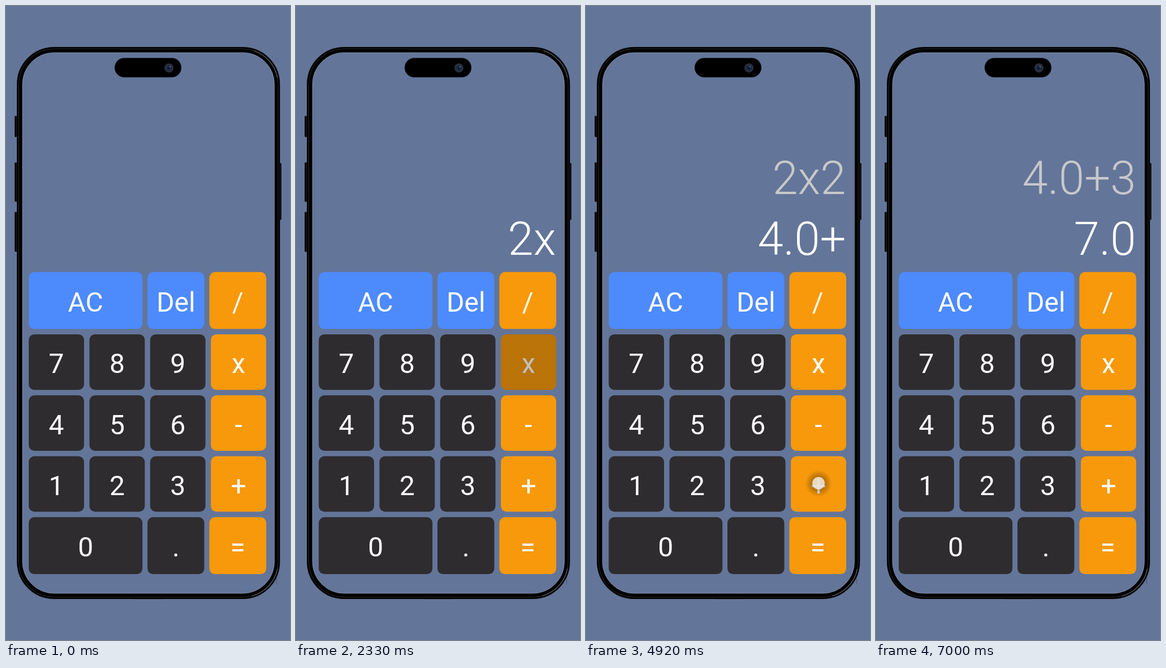
Animation, 502 px wide and 1116 px high, one loop 8 s. Source, as an HTML page with a canvas:

```html
<!DOCTYPE html>
<html lang="en">
<head>
<meta charset="utf-8">
<title>Calculator</title>
<style>
html, body { margin: 0; width: 100%; height: 100%; overflow: hidden; background: #637599; }
canvas { display: block; }
</style>
</head>
<body>
<canvas id="stage" width="502" height="1116"></canvas>
<script>
const ctx = document.getElementById('stage').getContext('2d');
const LOOP = 8000, STEP = 1000 / 12;
const DARK = '#2e2c2f', BLUE = '#4d8afc', ORANGE = '#f7990a';

// Keys: label -> [x, y, width, height, colour]
const keys = {
  AC: [40.2, 468.2, 201, 100.4, BLUE],
  Del: [250, 468.2, 100.5, 100.4, BLUE],
  '/': [359.5, 468.2, 100.5, 100.4, ORANGE],
  0: [40.2, 899.7, 201, 100.4, DARK],
  '.': [250, 899.7, 100.5, 100.4, DARK],
  '=': [359.5, 899.7, 100.5, 100.4, ORANGE]
};
['789x', '456-', '123+'].forEach((row, r) => [...row].forEach((label, c) => {
  keys[label] = [40.2 + c * 107.3, 577.9 + r * 107.3, 97.8, 97.8, c < 3 ? DARK : ORANGE];
}));

// Finger position, press time and how long the touch dot stays after it
const taps = [
  { key: '2', at: 1000, hold: 160, x: 199, y: 842, now: '2', past: '' },
  { key: 'x', at: 2000, hold: 160, x: 412, y: 627, now: '2x', past: '' },
  { key: '2', at: 2750, hold: 160, x: 199, y: 842, now: '2x2', past: '' },
  { key: '=', at: 3417, hold: 120, x: 412, y: 948, now: '4.0', past: '2x2' },
  { key: '+', at: 4834, hold: 160, x: 411, y: 840, now: '4.0+', past: '2x2' },
  { key: '3', at: 5333, hold: 160, x: 305, y: 843, now: '4.0+3', past: '2x2' },
  { key: '=', at: 5833, hold: 200, x: 422, y: 945, now: '7.0', past: '4.0+3' }
];

const clamp = v => Math.max(0, Math.min(1, v));

function box(x, y, w, h, r, fill, stroke, line = 1) {
  ctx.beginPath();
  ctx.roundRect(x, y, w, h, r);
  if (fill) { ctx.fillStyle = fill; ctx.fill(); }
  if (stroke) { ctx.strokeStyle = stroke; ctx.lineWidth = line; ctx.stroke(); }
}

function disc(x, y, r, fill) {
  ctx.beginPath();
  ctx.arc(x, y, r, 0, Math.PI * 2);
  ctx.fillStyle = fill;
  ctx.fill();
}

function text(str, x, y, font, align, fill) {
  ctx.font = font + ' Roboto, sans-serif';
  ctx.textAlign = align;
  ctx.fillStyle = fill;
  ctx.fillText(str, x, y);
}

function drawPhone() {
  ctx.fillStyle = '#637599';
  ctx.fillRect(0, 0, 502, 1116);
  for (const [x, y, h] of [[15, 193, 38], [15, 275, 70], [15, 362, 71], [482, 276, 101]])
    box(x, y, 5, h, 2, '#000', 'rgba(150,158,172,.5)', 0.8);
  box(24, 77, 455.5, 962, 61, null, '#000', 10);
  box(22.5, 75.5, 458.5, 965, 62, null, '#2c2d30');
  // light hairlines along the inner and outer edge
  box(29, 82, 445.5, 952, 56, null, 'rgba(170,178,190,.55)', 0.9);
  box(19, 72, 465.5, 972, 66, null, 'rgba(150,158,172,.35)', 0.8);
  // metallic glints on the right-hand corners
  ctx.strokeStyle = '#62656c';
  ctx.lineWidth = 1.2;
  ctx.beginPath();
  ctx.arc(418, 138.5, 63, -1.25, -0.2);
  ctx.stroke();
  ctx.beginPath();
  ctx.arc(418, 978, 63, 0.2, 1.3);
  ctx.stroke();
  ctx.fillStyle = '#000';
  ctx.fillRect(226, 1042, 52, 2);
  ctx.fillStyle = '#4d5a76';
  ctx.fillRect(478, 1006, 1, 12);
  box(192, 91.5, 118, 34, 17, '#000');
  disc(288, 109, 8, '#2a2f3b');
  disc(288, 109, 5.5, '#1d2a45');
  disc(288, 109, 2.5, '#11182a');
  disc(290, 107, 1.2, '#5575a6');
}

function drawKey(label) {
  const [x, y, w, h, colour] = keys[label];
  box(x, y, w, h, 10, colour);
  text(label, x + w / 2, y + h / 2 + 19.5, '48px', 'center', '#fff');
}

// Soft shade that spreads from the finger to the key's centre, then fades
function drawRipple(tap, t) {
  const dt = t - tap.at;
  const alpha = 0.3 * clamp((750 - dt) / 500);
  if (dt <= 0 || !alpha) return;
  const [x, y, w, h] = keys[tap.key];
  const k = clamp(dt / 200), r = 20 * (dt / STEP) ** 2;
  const cx = tap.x + (x + w / 2 - tap.x) * k;
  const cy = tap.y + (y + h / 2 - tap.y) * k;
  const shade = ctx.createRadialGradient(cx, cy, r * 0.5, cx, cy, r * 1.15);
  shade.addColorStop(0, `rgba(0,0,0,${alpha})`);
  shade.addColorStop(1, 'rgba(0,0,0,0)');
  box(x, y, w, h, 10, shade);
}

function drawDot(tap, t) {
  if (t < tap.at - STEP || t > tap.at + tap.hold) return;
  disc(tap.x, tap.y, 11, 'rgba(243,234,222,.85)');
}

function draw(ms) {
  // the screen refreshes twelve times a second
  const t = Math.floor((ms % LOOP + 5) / STEP) * STEP + 2;
  drawPhone();
  Object.keys(keys).forEach(drawKey);
  taps.forEach(tap => drawRipple(tap, t));
  taps.forEach(tap => drawDot(tap, t));
  const shown = taps.filter(tap => tap.at <= t).pop();
  if (shown) {
    text(shown.past, 459.5, 330.5, '300 81.5px', 'right', '#c8c8cb');
    text(shown.now, 459.5, 437.5, '300 81.5px', 'right', '#fff');
  }
}

const start = performance.now();
function tick() {
  draw(performance.now() - start);
  requestAnimationFrame(tick);
}
tick();
</script>
</body>
</html>
```
